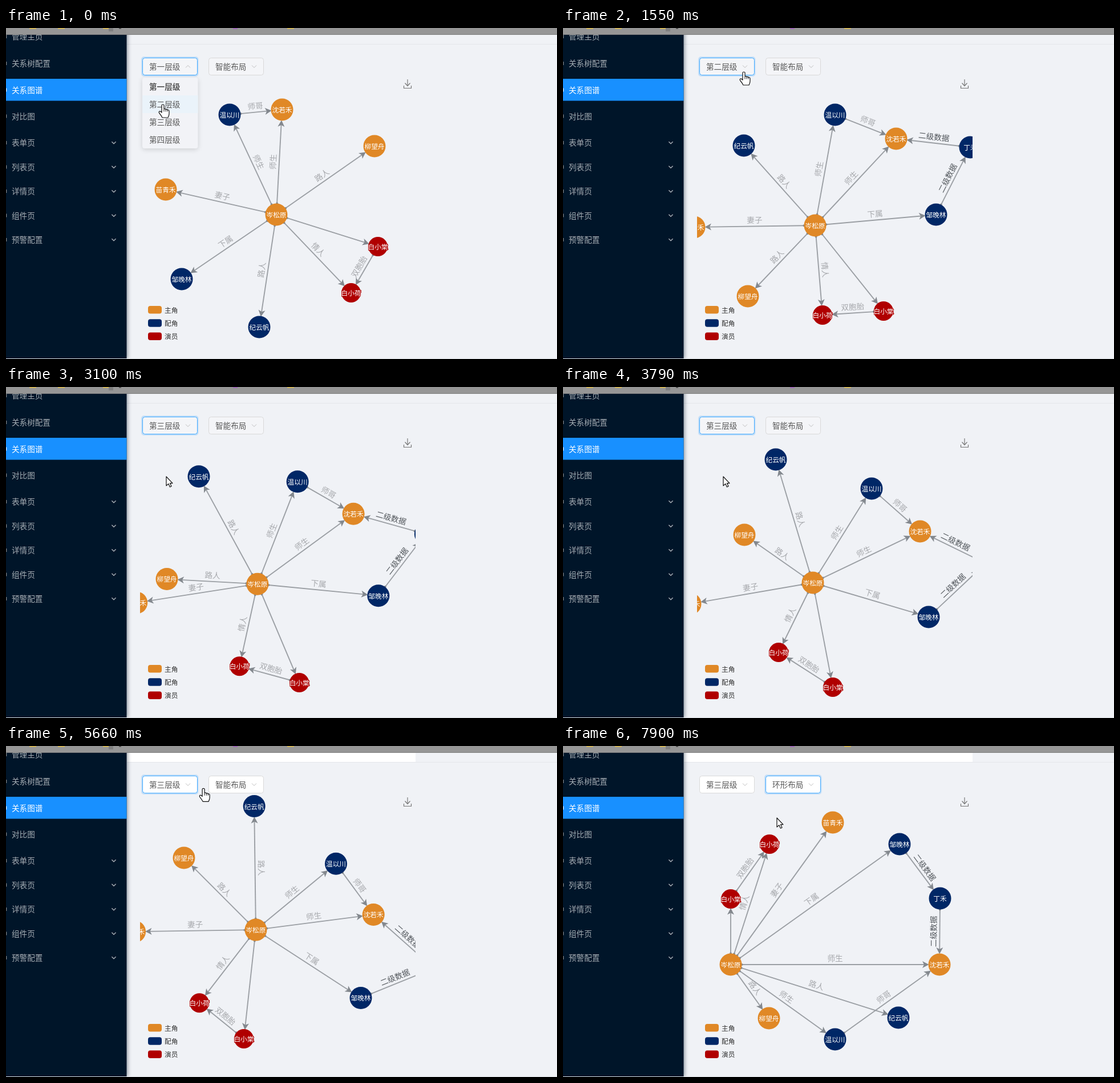
These frames come from a looping animation (966x580 px, 8000 ms). An HTML page with a canvas:

```html
<!DOCTYPE html>
<html lang="zh-CN">
<head>
<meta charset="utf-8">
<title>关系图谱</title>
<style>
  html, body { margin: 0; width: 100%; height: 100%; overflow: hidden; background: #f0f2f6; }
  canvas { display: block; }
</style>
</head>
<body>
<canvas id="stage" width="966" height="580"></canvas>
<script>
const ctx = document.getElementById('stage').getContext('2d');
const FONT = '"Noto Sans CJK SC", "Noto Sans CJK", sans-serif';
const LOOP = 8000;
const ORANGE = '#e08826', NAVY = '#002766', RED = '#b00000', BLUE = '#1890ff';

// Moments the user acts
const PICK_SECOND = 430, OPEN_LEVEL = 1750, PICK_THIRD = 2710, OPEN_LAYOUT = 6430, PICK_RING = 7250;
const REPAINT = 4960;

// Screen refreshes: first time, last time, count
const refreshes = [[430, 1400, 8], [1550, 2560, 9], [2710, 3640, 8], [3790, 4820, 8],
                   [4960, 5930, 8], [6050, 7000, 8], [7150, 7900, 7]];

// Layout moves between consecutive node positions: start, end, sharpness of the ease-out
const moves = [[430, 1550, 4], [1550, 2560, 1], [2710, 3790, 4], [3790, 4820, 1],
               [4820, 6580, 1.5], [PICK_RING, 7750, 4]];

const node = (name, color, ...points) => ({ name, color, points, r: color === RED ? 17 : 19.5 });
const nodes = {
  hub:     node('岑松原', ORANGE, [474,327], [442,346], [446,349], [438,343], [436,328], [439,319], [294,383]),
  senior:  node('温以川', NAVY, [392,152], [477,152], [455,160], [541,178], [571,199], [582,210], [477,514]),
  junior:  node('沈若禾', ORANGE, [484,143], [584,194], [566,179], [626,253], [640,287], [646,300], [660,383]),
  elder:   node('柳望舟', ORANGE, [646,207], [324,470], [337,494], [318,259], [316,213], [310,187], [361,477]),
  wife:    node('苗青禾', ORANGE, [280,283], [230,349], [239,375], [223,380], [223,337], [227,319], [473,134]),
  aide:    node('邹晚林', NAVY, [308,440], [654,327], [655,298], [641,403], [625,433], [620,446], [590,172]),
  mayor:   node('纪云帆', NAVY, [444,524], [317,206], [297,222], [373,127], [422,109], [442,104], [588,476]),
  twinA:   node('白小棠', RED, [652,383], [562,496], [579,485], [473,526], [430,518], [410,510], [294,268]),
  twinB:   node('白小荷', RED, [605,464], [455,503], [481,513], [378,465], [350,450], [333,450], [362,172]),
  extra:   node('丁禾', NAVY, [714,209], [714,209], [703,173], [741,309], [747,370], [751,400], [661,267]),
};
const edges = [
  ['hub', 'senior', '师生'], ['hub', 'junior', '师生'], ['hub', 'elder', '路人'], ['hub', 'wife', '妻子'],
  ['hub', 'aide', '下属'], ['hub', 'mayor', '路人'], ['hub', 'twinA', ''], ['hub', 'twinB', '情人'],
  ['senior', 'junior', '师哥'], ['twinA', 'twinB', '双胞胎'],
  ['aide', 'extra', '二级数据'], ['extra', 'junior', '二级数据'],
];

// Pointer path: time, x, y
const pointerPath = [[0,275,134], [700,275,134], [1450,317,77], [1800,317,77], [2430,281,157], [3900,281,157],
                     [4700,325,77], [5300,325,77], [6200,387,69], [6650,387,69], [7050,375,126], [8000,375,126]];

const clamp = v => Math.max(0, Math.min(1, v));
const mix = (a, b, u) => a + (b - a) * u;
const lastIndex = (list, t) => list.findLastIndex(item => item[0] <= t);

function refreshTime(t) {
  const i = lastIndex(refreshes, t);
  if (i < 0) return 0;
  const [start, end, count] = refreshes[i], gap = (end - start) / (count - 1);
  return start + gap * Math.min(count - 1, Math.floor((t - start) / gap + 1e-6));
}

function placeNodes(t) {
  const i = lastIndex(moves, t), spots = {};
  let u = 0;
  if (i >= 0) {
    const [start, end, k] = moves[i];
    u = (1 - Math.exp(-k * clamp((t - start) / (end - start)))) / (1 - Math.exp(-k));
  }
  const from = Math.max(i, 0), to = from + 1;
  const [ax, ay] = nodes.hub.points[from], [bx, by] = nodes.hub.points[to];
  for (const [id, { points }] of Object.entries(nodes)) {
    const [px, py] = points[from], [qx, qy] = points[to];
    if (to === 6) {
      spots[id] = [mix(px, qx, u), mix(py, qy, u)];
      continue;
    }
    // Force layouts swing round the hub
    const a = Math.atan2(py - ay, px - ax), b = Math.atan2(qy - by, qx - bx);
    const angle = a + u * Math.atan2(Math.sin(b - a), Math.cos(b - a));
    const radius = mix(Math.hypot(px - ax, py - ay), Math.hypot(qx - bx, qy - by), u);
    spots[id] = [mix(ax, bx, u) + radius * Math.cos(angle), mix(ay, by, u) + radius * Math.sin(angle)];
  }
  return spots;
}

function pointerAt(t) {
  const i = Math.min(lastIndex(pointerPath, t), pointerPath.length - 2);
  const [t0, x0, y0] = pointerPath[i], [t1, x1, y1] = pointerPath[i + 1];
  const u = clamp((t - t0) / (t1 - t0)), s = u * u * (3 - 2 * u);
  return [mix(x0, x1, s), mix(y0, y1, s)];
}

function rect(x, y, w, h, color) {
  ctx.fillStyle = color;
  ctx.fillRect(x, y, w, h);
}

function roundRect(x, y, w, h, r, fill) {
  ctx.beginPath();
  ctx.roundRect(x, y, w, h, r);
  ctx.fillStyle = fill;
  ctx.fill();
}

function text(str, x, y, size, color, align = 'left', weight = 400) {
  ctx.font = `${weight} ${size}px ${FONT}`;
  ctx.textAlign = align;
  ctx.textBaseline = 'middle';
  ctx.fillStyle = color;
  ctx.fillText(str, x, y);
}

function polyline(points, color, width) {
  ctx.beginPath();
  points.forEach(([x, y]) => ctx.lineTo(x, y));
  ctx.strokeStyle = color;
  ctx.lineWidth = width;
  ctx.stroke();
}

function dot(x, y, r, color) {
  ctx.beginPath();
  ctx.arc(x, y, r, 0, 7);
  ctx.fillStyle = color;
  ctx.fill();
}

function chevron(x, y, size, color, width, turn = 0) {
  ctx.save();
  ctx.translate(x, y);
  ctx.rotate(turn * Math.PI);
  polyline([[-size, -size / 2], [0, size / 2], [size, -size / 2]], color, width);
  ctx.restore();
}

function drawPage(t) {
  rect(0, 0, 966, 580, '#f0f2f6');
  if (t >= REPAINT) rect(212, 12, 506, 16, '#fff');
  rect(212, 28, 754, 1, '#e4e6ea');
}

function drawSidebar() {
  ctx.save();
  ctx.shadowColor = 'rgba(0,21,41,.35)';
  ctx.shadowBlur = 6;
  ctx.shadowOffsetX = 2;
  rect(0, 0, 211.5, 579, '#001529');
  ctx.restore();
  rect(0, 89, 211.5, 38.5, BLUE);
  const items = [['管理主页', 15], ['关系树配置', 62], ['关系图谱', 108.5], ['对比图', 154.5], ['表单页', 201],
                 ['列表页', 243.5], ['详情页', 286], ['组件页', 328.5], ['预警配置', 371]];
  items.forEach(([label, y], i) => {
    text(label, 10, y, 13.6, i === 2 ? '#fff' : '#a6adb4');
    rect(0, y - 3, 1.3, 6, i === 2 ? '#cfe6ff' : '#777c80');
    if (i > 3) chevron(189, y, 3.6, '#a6adb4', 1.4);
  });
  rect(0, 579, 966, 1, '#dcdfe3');
}

function drawTopStrip() {
  rect(0, 0, 966, 12, '#969696');
  rect(0, 11, 966, 1, '#7f7f7f');
  [41, 91, 170, 493].forEach(x => rect(x, 0, 12, 1.5, '#e3c04c'));
  rect(180, 0, 8, 6, '#808080');
  rect(398, 0, 8, 1.5, '#a05bc0');
  rect(198, 0, 4, 1.5, '#444');
}

function drawEdge(source, target, [x0, y0], [x1, y1], label) {
  const angle = Math.atan2(y1 - y0, x1 - x0), length = Math.hypot(x1 - x0, y1 - y0);
  const tip = length - target.r + 1;
  ctx.save();
  ctx.translate(x0, y0);
  ctx.rotate(angle);
  polyline([[source.r, 0], [tip - 6, 0]], '#9b9fa4', 1.9);
  dot(source.r, 0, 2, '#858a90');
  ctx.beginPath();
  [[tip, 0], [tip - 11.5, -6], [tip - 8.5, 0], [tip - 11.5, 6]].forEach(([x, y]) => ctx.lineTo(x, y));
  ctx.fillStyle = '#83888e';
  ctx.fill();
  ctx.translate(length / 2, 0);
  if (Math.cos(angle) < 0) ctx.rotate(Math.PI);
  text(label, 0, -11, 13.6, label.length === 4 ? '#50555a' : '#a6a8ac', 'center');
  ctx.restore();
}

function drawGraph(t) {
  const spots = placeNodes(t);
  const hidden = id => id === 'extra' && t < PICK_SECOND;
  ctx.save();
  ctx.beginPath();
  ctx.rect(235, 84, 483, 485);
  ctx.clip();
  for (const [a, b, label] of edges) {
    if (!hidden(a) && !hidden(b)) drawEdge(nodes[a], nodes[b], spots[a], spots[b], label);
  }
  for (const [id, { name, color, r }] of Object.entries(nodes)) {
    if (hidden(id)) continue;
    const [x, y] = spots[id];
    dot(x, y, r, color);
    ctx.font = `11.7px ${FONT}`;
    ctx.textAlign = 'center';
    ctx.textBaseline = 'middle';
    ctx.strokeStyle = color;
    ctx.lineWidth = 2;
    ctx.strokeText(name, x, y + .5);
    text(name, x, y + .5, 11.7, '#fff', 'center', 500);
  }
  ctx.restore();

  [['主角', ORANGE], ['配角', NAVY], ['演员', RED]].forEach(([label, color], i) => {
    roundRect(249, 487 + 23.2 * i, 24, 13.6, 4, color);
    text(label, 278, 494.5 + 23.2 * i, 11.7, '#333');
  });
  polyline([[704, 90], [704, 101]], '#777', 1.2);
  polyline([[699.5, 96.5], [704, 101.5], [708.5, 96.5]], '#777', 1.2);
  polyline([[697.5, 101], [697.5, 105.5], [710.5, 105.5], [710.5, 101]], '#777', 1.2);
}

function drawSelect(x, label, focused, open, fill) {
  if (focused) roundRect(x - 2, 50, 100.5, 35, 5, 'rgba(24,144,255,.2)');
  roundRect(x + .5, 52.5, 96, 30, 4, fill);
  ctx.strokeStyle = focused ? '#40a9ff' : '#d9d9d9';
  ctx.lineWidth = 1;
  ctx.stroke();
  text(label, x + 12, 68, 13.6, '#595959');
  chevron(x + 80, 67.5, 4, '#bfbfbf', 1, open);
}

function drawMenu(x, options, selected, open, pointerY, fill, hoverFill) {
  if (!open) return;
  const active = pointerY < 87 ? selected : Math.floor((pointerY - 87) / 31);
  ctx.save();
  ctx.globalAlpha = Math.min(1, open * 1.4);
  ctx.translate(0, 87);
  ctx.scale(1, mix(.8, 1, Math.min(1, open * 1.4)));
  ctx.shadowColor = 'rgba(0,0,0,.15)';
  ctx.shadowBlur = 8;
  ctx.shadowOffsetY = 2;
  roundRect(x, 0, 97.5, 124, 4, fill);
  ctx.shadowColor = 'transparent';
  options.forEach((option, i) => {
    if (i === active) rect(x, 31 * i, 97.5, 31, hoverFill);
    text(option, x + 12, 31 * i + 16, 13.6, '#595959', 'left', i === selected ? 600 : 400);
  });
  ctx.restore();
}

const arrowShape = new Path2D('M0 0V16L3.8 12.6L6.4 18.2L9 17L6.5 11.6H11Z');
const handShape = new Path2D('M-2 1.5Q-2 0 0 0Q2 0 2 1.5V8Q4 6.8 5.2 8.6Q7 7.6 8.2 9.6Q11 9 11 12V16Q11 19 9 23H-1Q-3 19-6 15.5Q-7.6 13-6 12Q-4.4 11.4-2 14Z');

function drawPointer(x, y, hand) {
  const shape = hand ? handShape : arrowShape;
  ctx.save();
  ctx.translate(x, y);
  ctx.lineJoin = 'round';
  ctx.fillStyle = '#fff';
  ctx.fill(shape);
  ctx.strokeStyle = '#111';
  ctx.lineWidth = 1.2;
  ctx.stroke(shape);
  if (hand) [2, 5.2, 8.2].forEach(fx => polyline([[fx, 8.5], [fx, 12.5]], '#111', 1));
  ctx.restore();
}

const levels = ['第一层级', '第二层级', '第三层级', '第四层级'];
const layouts = ['智能布局', '环形布局', '中心布局', '自定义布局'];

function draw(t) {
  const openness = (start, end) => clamp((t - start) / 200) - clamp((t - end) / 200);
  const level = t < PICK_SECOND ? 0 : t < PICK_THIRD ? 1 : 2;
  const layout = t < PICK_RING ? 0 : 1;
  const levelOpen = openness(-1000, PICK_SECOND) + openness(OPEN_LEVEL, PICK_THIRD);
  const layoutOpen = openness(OPEN_LAYOUT, PICK_RING);
  const [px, py] = pointerAt(t);
  const selectFill = t < REPAINT ? '#f4f5f8' : '#fff';
  const early = t < PICK_SECOND;

  drawPage(t);
  drawSidebar();
  drawTopStrip();
  drawGraph(t);
  drawSelect(239, levels[level], t < OPEN_LAYOUT, levelOpen, selectFill);
  drawSelect(355, layouts[layout], t >= OPEN_LAYOUT, layoutOpen, selectFill);
  drawMenu(239, levels, level, levelOpen, py, early ? '#f2f3f7' : '#fff', early ? '#eaf3fa' : '#e6f7ff');
  drawMenu(355, layouts, layout, layoutOpen, py, '#fff', '#e6f7ff');
  drawPointer(px, py, py < 84 || levelOpen > .5 || layoutOpen > .5);
}

const begin = performance.now();
function tick() {
  draw(refreshTime((performance.now() - begin) % LOOP));
  requestAnimationFrame(tick);
}
tick();
</script>
</body>
</html>
```
